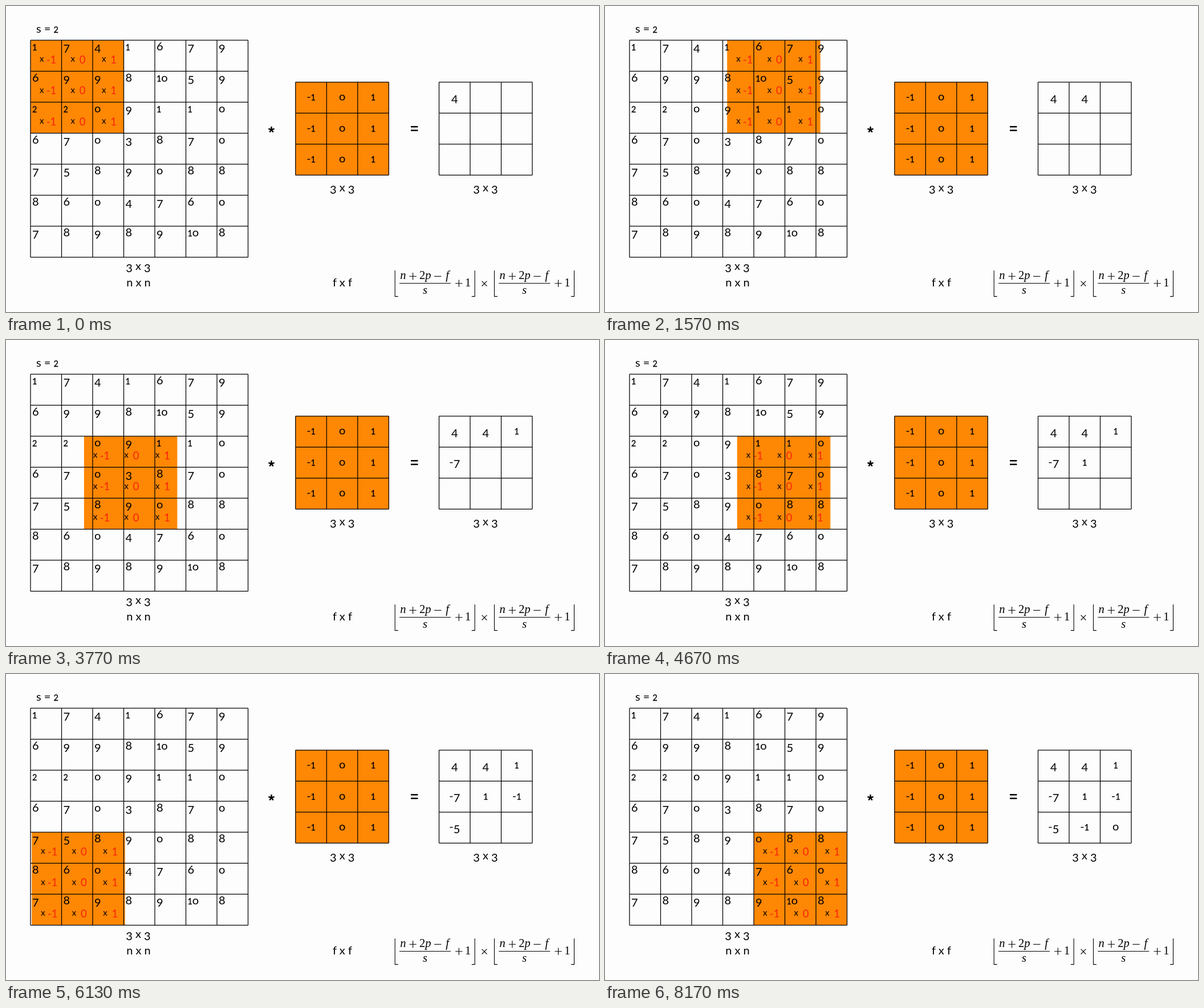
An HTML page that plays this animation: 1040x538 px, repeating every 8210 ms.

```html
<!DOCTYPE html>
<html lang="en">
<head>
<meta charset="utf-8">
<title>Strided convolution</title>
<style>
  html, body { margin: 0; width: 100%; height: 100%; overflow: hidden; background: #fdfdfd; }
  svg { display: block; width: 100vw; height: 100vh; }
  text { font: 20px Lato, "Open Sans", sans-serif; white-space: pre; fill: #000; }
  .small { font-size: 14.4px; stroke: #000; stroke-width: .3px; }
  .times { font-size: 15px; }
  .weight { font-size: 18.5px; fill: #f8220c; }
  .mid { text-anchor: middle; }
  .fill { fill: #fe8704; }
  .line { fill: none; stroke: #000; stroke-width: 1.25px; }
  .bold { fill: none; stroke: #000; stroke-width: 2.4px; }
  .thin { fill: none; stroke: #000; stroke-width: 1.1px; }
  .math { font: 20.5px "Liberation Serif", serif; }
  .var { font-style: italic; }
</style>
</head>
<body>
<svg id="stage" viewBox="0 0 1040 538"></svg>
<script>
const NS = 'http://www.w3.org/2000/svg';
const stage = document.getElementById('stage');
const CELL = 54.5, LOOP = 8210, START = 30, STEP = 1000, STRIDE = 2;
const input = { x: 43, y: 60.2, n: 7 };
const kernel = { x: 507.8, y: 133.8, n: 3 };
const output = { x: 759.5, y: 133.8, n: 3 };
const values = [
  [1, 7, 4, 1, 6, 7, 9],
  [6, 9, 9, 8, 10, 5, 9],
  [2, 2, 0, 9, 1, 1, 0],
  [6, 7, 0, 3, 8, 7, 0],
  [7, 5, 8, 9, 0, 8, 8],
  [8, 6, 0, 4, 7, 6, 0],
  [7, 8, 9, 8, 9, 10, 8]
];
const weights = [-1, 0, 1];

function add(parent, tag, attrs, content) {
  const el = document.createElementNS(NS, tag);
  for (const key in attrs) el.setAttribute(key, attrs[key]);
  if (content !== undefined) el.textContent = content;
  return parent.appendChild(el);
}

const path = (cls, d, parent = stage) => add(parent, 'path', { class: cls, d });

// Old-style figures: 0-2 stand at x-height, 3 4 5 7 9 hang below the baseline.
function label(x, y, content, cls = 'mid') {
  const text = add(stage, 'text', { x, y, class: cls });
  let drop = 0;
  for (const ch of String(content)) {
    const next = '34579'.includes(ch) ? 4.3 : 0;
    const attrs = { dy: next - drop };
    if (ch === '1' || ch === '2') attrs.class = 'small';
    add(text, 'tspan', attrs, ch === '0' ? 'o' : ch);
    drop = next;
  }
  return text;
}

function eachCell(n, draw) {
  for (let i = 0; i < n * n; i++) draw(i % n, Math.floor(i / n), i);
}

function grid({ x, y, n }) {
  const size = n * CELL;
  let d = '';
  for (let i = 0; i <= n; i++) {
    d += `M${x + i * CELL} ${y}v${size}M${x} ${y + i * CELL}h${size}`;
  }
  path('line', d);
}

function block(parent, x, y) {
  add(parent, 'rect', { class: 'fill', x, y, width: 3 * CELL, height: 3 * CELL });
}

// Sliding window
const win = add(stage, 'g', {});
block(win, input.x, input.y);
eachCell(3, (c, r) => {
  const x = input.x + c * CELL, y = input.y + r * CELL;
  add(win, 'text', { x: x + 19.7, y: y + 38, class: 'times mid' }, 'x');
  add(win, 'text', { x: x + 36.5, y: y + 40.6, class: 'weight mid' }, weights[c]);
});
block(stage, kernel.x, kernel.y);
[input, kernel, output].forEach(grid);

// Numbers
eachCell(7, (c, r) =>
  label(input.x + c * CELL + 3, input.y + r * CELL + 17.8, values[r][c], 'left'));

const centred = (box, c, r, value) =>
  label(box.x + (c + .5) * CELL, box.y + r * CELL + 32.6, value);

function convolve(c, r) {
  let sum = 0;
  eachCell(3, (i, j) => sum += weights[i] * values[r * STRIDE + j][c * STRIDE + i]);
  return sum;
}

eachCell(3, (c, r) => centred(kernel, c, r, weights[c]));
const results = [];
eachCell(3, (c, r) => results.push(centred(output, c, r, convolve(c, r))));

// Captions and operators
label(53, 47.2, 's = 2', 'left');
label(232, 464, '3 x 3');
label(232.5, 493.3, 'n x n');
label(589.7, 326, '3 x 3');
label(841, 326, '3 x 3');
label(590, 493.3, 'f x f');
path('bold', 'M710 212.3h12.4M710 218.7h12.4');
let star = '';
for (let i = 0; i < 5; i++) {
  const a = i * Math.PI * .4 - Math.PI / 2;
  star += `M465.5 217.5l${5.4 * Math.cos(a)} ${5.4 * Math.sin(a)}`;
}
path('bold', star);

// Output size formula
function floorTerm(dx) {
  const g = add(stage, 'g', { transform: `translate(${dx})` });
  const glyph = (x, y, ch, cls = '') => add(g, 'text', { x, y, class: `math mid ${cls}` }, ch);
  const plus = (x, y) => path('thin', `M${x - 6.2} ${y}h12.4M${x} ${y - 6.2}v12.4`, g);
  glyph(696.3, 480.3, 'n', 'var');
  plus(713.6, 475.3);
  glyph(730, 480.3, '2');
  glyph(740.3, 480.3, 'p', 'var');
  path('thin', 'M751 475.3h12.4', g);
  glyph(774, 480.3, 'f', 'var');
  path('thin', 'M690 487.5h90', g);
  glyph(735, 506, 's', 'var');
  plus(794.3, 487.7);
  glyph(810, 493.3, '1');
  path('thin', 'M682.2 465v45.6h5.4M822.2 465v45.6h-5.4', g);
}
floorTerm(0);
floorTerm(174.3);
path('thin', 'M834.6 483.7l8.8 8.8m0-8.8l-8.8 8.8');

// Motion
const at = k => (START + k * STEP) / LOOP;
const timing = { duration: LOOP, iterations: Infinity };
const stops = results.map((_, k) => ({
  offset: at(k),
  easing: 'ease-in-out',
  transform: `translate(${k % 3 * STRIDE * CELL}px, ${Math.floor(k / 3) * STRIDE * CELL}px)`
}));
win.animate([
  { ...stops[0], offset: 0 },
  ...stops,
  { ...stops[8], offset: 1 }
], timing);

results.forEach((el, k) => {
  if (!k) return;
  el.animate([
    { opacity: 0, offset: 0 },
    { opacity: 0, offset: at(k) },
    { opacity: 1, offset: at(k) },
    { opacity: 1, offset: 1 }
  ], timing);
});
</script>
</body>
</html>
```
